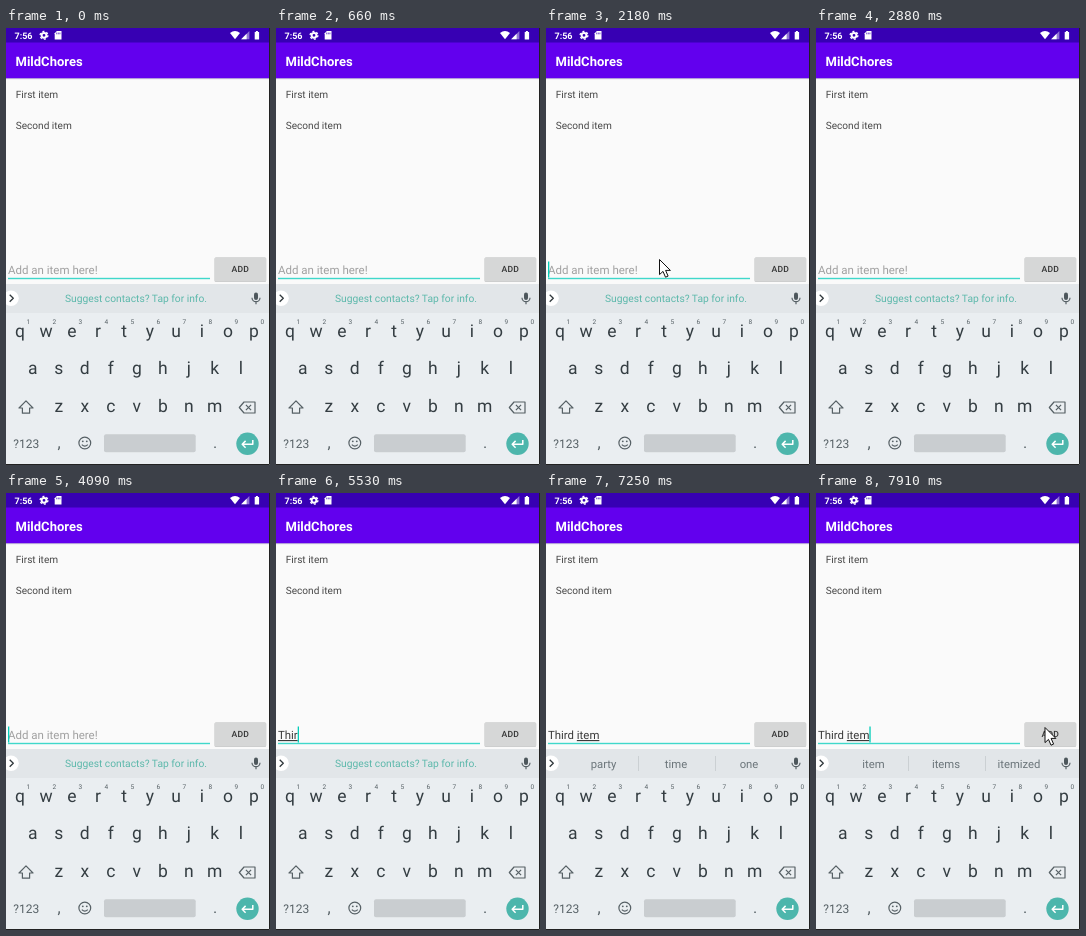
An HTML page for the animation above (8 s loop, 264 by 437 pixels).

```html
<!DOCTYPE html>
<html lang="en">
<head>
<meta charset="utf-8">
<title>To-do list</title>
<style>
  html, body { margin: 0; width: 100%; height: 100%; overflow: hidden; background: #fafafa; }
  svg { display: block; width: 100vw; height: 100vh; font-family: Roboto, sans-serif; }
  text { white-space: pre; text-rendering: geometricPrecision; }
  .mid { text-anchor: middle; }
  .line { fill: none; stroke: #566065; stroke-width: 1.2; stroke-linejoin: round; }
</style>
</head>
<body>
<svg viewBox="0 0 264 437" xmlns="http://www.w3.org/2000/svg">
  <rect width="264" height="437" fill="#fafafa"/>

  <g id="header">
    <rect y="50" width="264" height="1" fill="#b39ddb"/>
    <rect y="51" width="264" height="1" fill="#f1f0f4"/>
    <rect y="14" width="264" height="36" fill="#6200ee"/>
    <rect width="264" height="14.5" fill="#3700b3"/>
    <g fill="#fff">
      <text x="8.5" y="10.7" font-size="9" font-weight="700">7:56</text>
      <circle cx="38" cy="7.3" r="2.4" fill="none" stroke="#fff" stroke-width="2"/>
      <circle cx="38" cy="7.3" r="3.9" fill="none" stroke="#fff" stroke-width="1.3" stroke-dasharray="2.04 2.04"/>
      <path d="M50.8 3H55.5V11.5H48.7V5.2Z"/>
      <path d="M50.7 4.6v1.7M52.3 4.6v1.7M53.9 4.6v1.7" stroke="#3700b3" stroke-width=".7"/>
      <path d="M224 5Q229 1.2 234 5L229 11.2Z"/>
      <path d="M243.4 3V11.3H235.2Z" fill-opacity=".45"/>
      <path d="M240.6 5.8V11.3H235.2Z"/>
      <path d="M248.7 4h1.2V3h2V4h1.2v7.5H248.7Z"/>
      <text x="9.5" y="38" font-size="13" font-weight="700">MildChores</text>
    </g>
  </g>

  <g font-size="10.1" fill="#484848">
    <text x="9.7" y="70">First item</text>
    <text x="9.7" y="101">Second item</text>
  </g>

  <g id="entry">
    <text id="hint" x="2" y="246" font-size="11.5" fill="#a0a0a0">Add an item here!</text>
    <text id="typed" x="2" y="246" font-size="11.4" fill="#3a3a3a"><tspan id="done"></tspan><tspan id="word" text-decoration="underline"></tspan></text>
    <rect x="2" y="249.8" width="202" height="1.4" fill="#3fd8ca"/>
    <rect id="caret" y="233.5" width="1.3" height="16" fill="#03cdb9"/>
    <rect x="208.5" y="229.5" width="51.7" height="24.6" rx="1.5" fill="#c9caca"/>
    <rect x="208.5" y="229.2" width="51.7" height="24" rx="1.5" fill="#d6d7d7"/>
    <text class="mid" x="234.3" y="244.2" font-size="8.6" font-weight="500" letter-spacing=".2" fill="#333">ADD</text>
  </g>

  <rect y="256" width="264" height="181" fill="#eaeef1"/>
  <rect y="256" width="264" height="29" fill="#e2e6e9"/>
  <circle cx="5" cy="270.3" r="7.8" fill="#fff"/>
  <path class="line" d="M3.7 266.8L7.3 270.3L3.7 273.8" style="stroke:#30383c;stroke-width:1.3"/>
  <text id="notice" class="mid" x="130" y="274.3" font-size="10.25" fill="#5cb8ab">Suggest contacts? Tap for info.</text>
  <g id="picks" font-size="11.3" fill="#6b757a">
    <path d="M92.5 263v15M169.5 263v15" stroke="#cbd0d3"/>
    <text class="mid" x="57.5" y="274.5"></text>
    <text class="mid" x="130" y="274.5"></text>
    <text class="mid" x="203" y="274.5"></text>
  </g>
  <rect x="248" y="264.5" width="4" height="7.6" rx="2" fill="#4d575c"/>
  <path class="line" d="M246 269.7a4 4 0 0 0 8 0M250 273.7v2.6"/>

  <g id="keys" class="mid" fill="#343d42"></g>
  <path class="line" d="M20 372.9L27 380H23.6V385.2H16.4V380H13Z"/>
  <path class="line" d="M238 374H249V385H238L233.3 379.5Z"/>
  <path class="line" d="M239.9 376.9l5.2 5.2m0-5.2l-5.2 5.2"/>
  <g fill="#566065">
    <text x="7.3" y="419.5" font-size="12">?123</text>
    <text class="mid" x="53" y="420.3" font-size="16">,</text>
    <text class="mid" x="209" y="420.3" font-size="16">.</text>
    <circle class="line" cx="78.8" cy="415" r="5.9"/>
    <circle cx="76.8" cy="413.3" r=".9"/>
    <circle cx="80.8" cy="413.3" r=".9"/>
    <path class="line" d="M75.8 416.7q3 3 6 0"/>
  </g>
  <rect x="98" y="406.3" width="91.7" height="18" rx="2" fill="#c9cdd0"/>
  <circle cx="241.5" cy="415.8" r="11.2" fill="#4db6ac"/>
  <path class="line" d="M246.8 412V416.3H236.4M239.6 412.9L236.2 416.3L239.6 419.7" style="stroke:#fff;stroke-width:1.5"/>

  <path id="pointer" d="M.5 .5V15.6L4 12.4L6.5 18.2L9.1 17.1L6.6 11.4H11.4Z" fill="#fff" stroke="#111" stroke-width="1"/>
  <path d="M263.5 0V436.5H0" fill="none" stroke="#222"/>
</svg>
<script>
const LOOP = 8000;
const $ = id => document.getElementById(id);

function addText(parent, x, y, size, str, fill) {
  const t = document.createElementNS('http://www.w3.org/2000/svg', 'text');
  const attrs = { x, y, 'font-size': size, ...(fill && { fill }) };
  for (const k in attrs) t.setAttribute(k, attrs[k]);
  t.textContent = str;
  parent.append(t);
}

[['qwertyuiop', 14, 308.7], ['asdfghjkl', 26.8, 346.4], ['zxcvbnm', 52.8, 384.4]].forEach(([row, x, y], r) =>
  [...row].forEach((ch, i) => {
    addText($('keys'), x + 26 * i, y, 17.5, ch);
    if (!r) addText($('keys'), x + 8.3 + 26 * i, 296.3, 6.5, (i + 1) % 10, '#566065');
  }));

// Each track holds [start, value] steps; the last one reached applies.
const caretFlips = [270, 660, 1090, 1650, 2180, 2450, 3140, 3690, 4090, 4670, 5100, 7250, 7780];

const typing = [
  [0, ['', '']],
  [5100, ['', 'T']], [5230, ['', 'Th']], [5380, ['', 'Thi']], [5530, ['', 'Thir']],
  [5960, ['', 'Third']], [6230, ['Third ', '']],
  [6380, ['Third ', 'it']], [6690, ['Third ', 'item']]
];

const suggestions = [
  [0, null],
  [6080, ['Third', 'thirds', 'third']],
  [6230, ['party', 'time', 'one']],
  [7390, ['item', 'items', 'itemized']]
];

const pointerPath = [
  [0, null],
  [540, [244, 285]], [660, null], [940, [261, 278]], [1220, null],
  [1770, [196, 255]], [1890, [181, 252]], [2030, [158, 251]], [2180, [113, 231]], [2880, null],
  [7660, [254, 236]], [7780, [243, 235]], [7910, [228.5, 234]]
];

const at = (track, t) => track.filter(([start]) => start <= t).pop()[1];
const show = (el, on) => el.setAttribute('visibility', on ? 'visible' : 'hidden');
const setText = (el, str) => { if (el.textContent !== str) el.textContent = str; };

function render(t) {
  const [done, word] = at(typing, t);
  setText($('done'), done);
  setText($('word'), word);
  show($('hint'), !(done + word));

  const width = done + word ? $('typed').getComputedTextLength() : 0;
  $('caret').setAttribute('x', 2 + width);
  show($('caret'), caretFlips.filter(f => f <= t).length % 2);

  const picks = at(suggestions, t);
  show($('notice'), !picks);
  show($('picks'), picks);
  if (picks) $('picks').querySelectorAll('text').forEach((el, i) => setText(el, picks[i]));

  const pos = at(pointerPath, t);
  show($('pointer'), pos);
  if (pos) $('pointer').setAttribute('transform', `translate(${pos})`);
}

const origin = performance.now();
function tick() {
  render((performance.now() - origin) % LOOP);
  requestAnimationFrame(tick);
}
tick();
</script>
</body>
</html>
```
